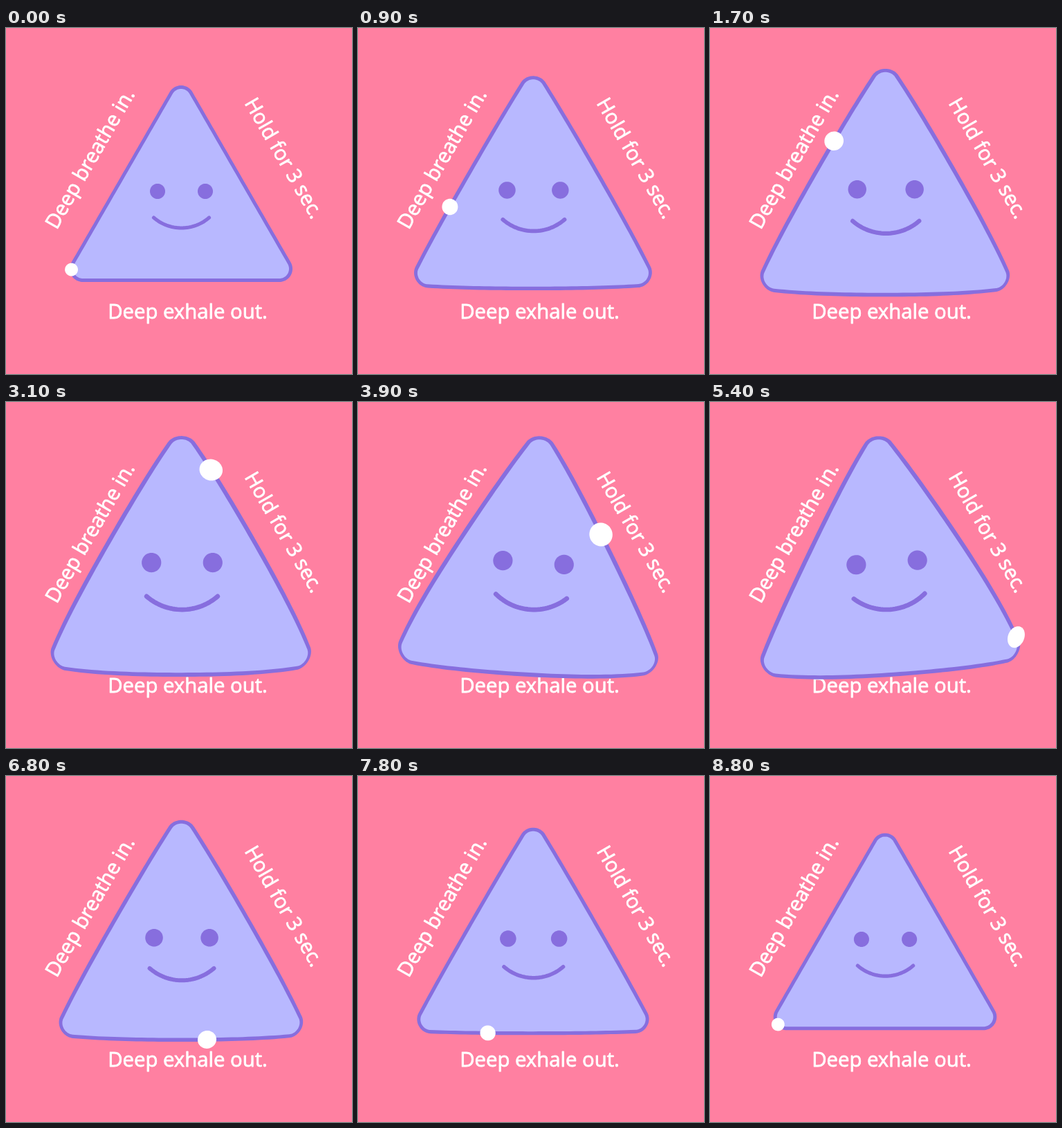
Write an HTML page with a canvas that moves like this. It is 500 px wide and 500 px high and loops after 8900 ms.

```html
<!DOCTYPE html>
<html lang="en">
<head>
<meta charset="utf-8">
<title>Breathing triangle</title>
<style>
  html, body { margin: 0; width: 100%; height: 100%; overflow: hidden; background: #ff80a1; }
  canvas { display: block; width: 500px; height: 500px; }
</style>
</head>
<body>
<canvas id="stage"></canvas>
<script>
const LOOP = 8900, STEP = 100, SIZE = 500, RAD = Math.PI / 180;
const PINK = '#ff80a1', LILAC = '#b8b8ff', VIOLET = '#876ede';
const canvas = document.getElementById('stage');
const ctx = canvas.getContext('2d');
const ratio = window.devicePixelRatio || 1;
canvas.width = canvas.height = SIZE * ratio;

// Rounded triangle: corner centres, side length, corner radius, stroke width
const CORNERS = [[111, 348], [253, 102], [395, 348]];
const SIDE = 284, RADIUS = 16.5, LINE = 5;
const ARC = RADIUS * 120 * RAD;
const START = 34 * RAD * RADIUS;   // arc left before the first side

// Distance travelled by the dot along the outline
const TRAVEL = [[0, 0], [1700, 197.5], [3100, 368], [4700, 532], [5400, 607.4],
                [6800, 756.5], [8800, 945], [LOOP, 3 * (SIDE + ARC)]];

const clamp = v => Math.min(1, Math.max(0, v));

function travel(t) {
  const i = TRAVEL.findIndex(k => k[0] > t);
  const [t0, s0] = TRAVEL[i - 1], [t1, s1] = TRAVEL[i];
  return s0 + (s1 - s0) * (t - t0) / (t1 - t0);
}

function inflation(t) {
  const grow = 1 - Math.pow(1 - clamp(t / 2800), 1.33);
  const shrink = Math.pow(1 - clamp((t - 5650) / 3250), 1.3);
  return 0.285 * grow * shrink;
}

function tilt(t) {
  if (t < 3100 || t > 3100 + 4 * 619) return 0;
  const s = Math.sin((t - 3100) / 619 * 2 * Math.PI);
  return s * (s > 0 ? 3.9 : 4.4) * RAD;
}

const dotRadius = t => 9.4 + 4.1 * clamp(t / 3000) * (1 - clamp((t - 5500) / 3200));

// Twirl about the triangle's middle, then bulge about the stage centre
function makeWarp(t) {
  const swell = inflation(t), angle = tilt(t);
  return ([px, py]) => {
    const x = px - 253, y = py - 225;
    const a = angle * (1 - 0.2 * (x * x + y * y) / 36000);
    const c = Math.cos(a), s = Math.sin(a);
    const dx = 253 + x * c - y * s - 250, dy = 225 + x * s + y * c - 250;
    const q = Math.min(1, Math.hypot(dx, dy) / 253);
    const m = 1 + swell * (1 - q * q * q);
    return [250 + dx * m, 250 + dy * m];
  };
}

const polar = ([x, y], r, a) => [x + r * Math.cos(a), y + r * Math.sin(a)];

function arcPoints(centre, r, from, to, n) {
  return Array.from({ length: n + 1 }, (_, i) => polar(centre, r, from + (to - from) * i / n));
}

function outline(r) {
  const points = [];
  CORNERS.forEach((corner, k) => {
    const from = (90 + 120 * k) * RAD, to = from + 120 * RAD;
    points.push(...arcPoints(corner, r, from, to, 24));
    const a = polar(corner, r, to), b = polar(CORNERS[(k + 1) % 3], r, to);
    for (let i = 1; i < 40; i++) {
      points.push([a[0] + (b[0] - a[0]) * i / 40, a[1] + (b[1] - a[1]) * i / 40]);
    }
  });
  return points;
}

function pathPoint(s) {
  const span = SIDE + ARC;
  const d = (s + ARC - START) % (3 * span);
  const k = Math.floor(d / span), along = d - k * span;
  const from = (90 + 120 * k) * RAD;
  if (along < ARC) return polar(CORNERS[k], RADIUS, from + along / RADIUS);
  const a = polar(CORNERS[k], RADIUS, from + 120 * RAD);
  return polar(a, along - ARC, from + 210 * RAD);
}

function trace(points, warp) {
  ctx.beginPath();
  points.forEach(p => ctx.lineTo(...warp(p)));
}

function fillShape(points, warp, color) {
  trace(points, warp);
  ctx.closePath();
  ctx.fillStyle = color;
  ctx.fill();
}

const disc = (centre, r) => arcPoints(centre, r, 0, 2 * Math.PI, 48);

// A thin stroke gives the letters a medium weight
function label(text, x, y, degrees) {
  ctx.save();
  ctx.translate(x, y);
  ctx.rotate(degrees * RAD);
  ctx.fillText(text, 0, 0);
  ctx.strokeText(text, 0, 0);
  ctx.restore();
}

const OUTER = outline(RADIUS + LINE / 2), INNER = outline(RADIUS - LINE / 2);
const EYES = [disc([219, 236], 11), disc([288, 236], 11)];
const SMILE = arcPoints([253.5, 228], 61, 131 * RAD, 49 * RAD, 32);

function draw(t) {
  const warp = makeWarp(t);
  ctx.setTransform(ratio, 0, 0, ratio, 0, 0);
  ctx.fillStyle = PINK;
  ctx.fillRect(0, 0, SIZE, SIZE);

  ctx.fillStyle = ctx.strokeStyle = '#fff';
  ctx.lineWidth = 0.8;
  ctx.lineCap = ctx.lineJoin = 'round';
  ctx.font = '29.3px "Open Sans", "Noto Sans", sans-serif';
  ctx.textAlign = 'center';
  label('Deep breathe in.', 130, 194, -60);
  label('Hold for 3 sec.', 393, 193, 60);
  label('Deep exhale out.', 262.5, 420, 0);

  fillShape(OUTER, warp, VIOLET);
  fillShape(INNER, warp, LILAC);
  EYES.forEach(eye => fillShape(eye, warp, VIOLET));

  trace(SMILE, warp);
  ctx.strokeStyle = VIOLET;
  ctx.lineWidth = 5.2 * (1 + inflation(t));
  ctx.stroke();

  fillShape(disc(pathPoint(travel(t)), dotRadius(t)), warp, '#fff');
}

const begin = performance.now();
function tick() {
  const t = (performance.now() - begin) % LOOP;
  draw(Math.floor(t / STEP) * STEP);
  requestAnimationFrame(tick);
}
tick();
</script>
</body>
</html>
```
